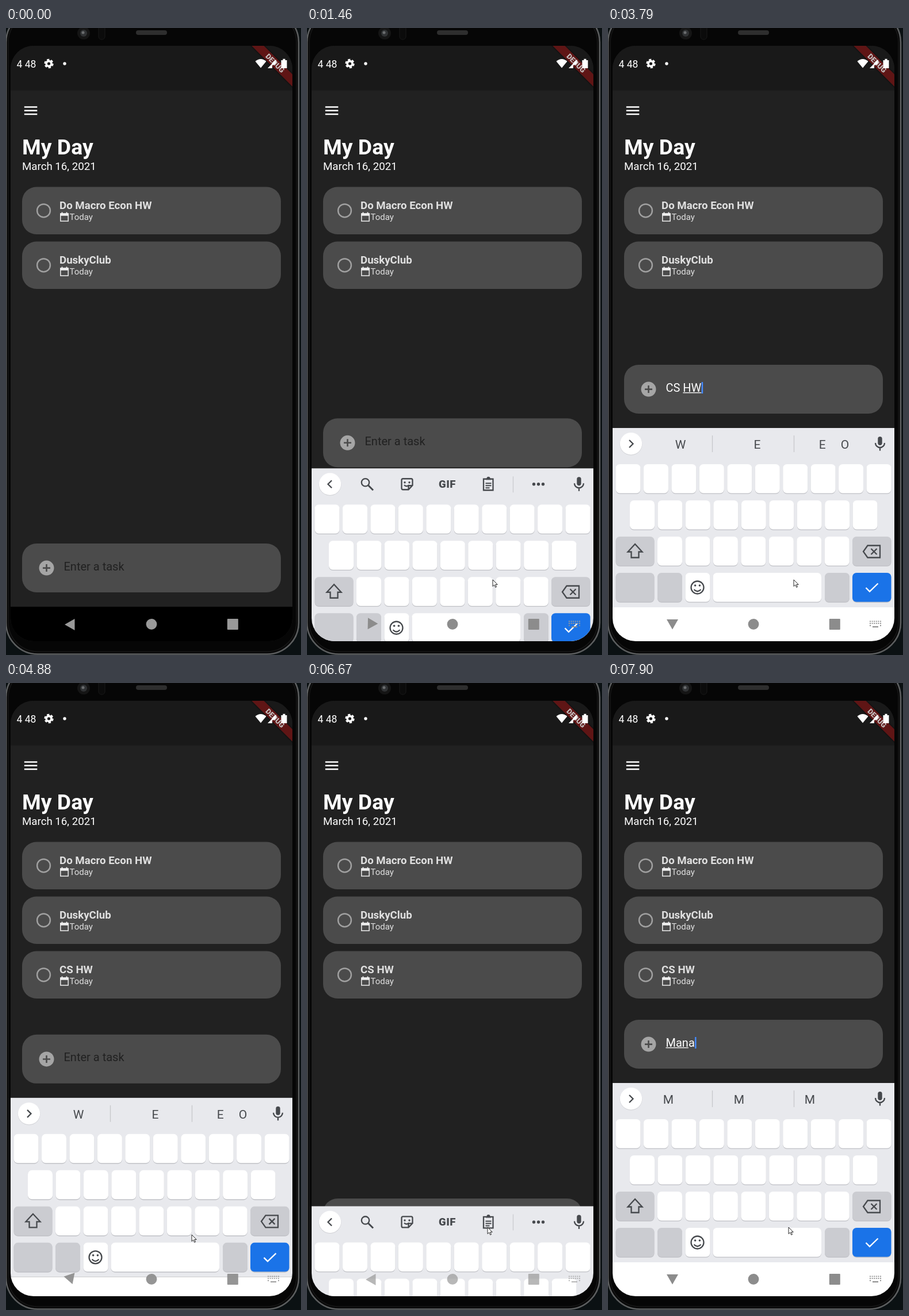
These frames come from a looping animation (513x1091 px, 8 s). An HTML page:

```html
<!DOCTYPE html>
<html lang="en">
<head>
<meta charset="utf-8">
<title>My Day</title>
<style>
  html, body { margin: 0; width: 100%; height: 100%; overflow: hidden; background: #050505; }
  svg { display: block; width: 100%; height: 100%; font-family: Roboto, sans-serif; }
  text { white-space: pre; }
  .line { fill: none; stroke: #46494d; stroke-width: 2.3; }
  .ink { fill: #46494d; }
</style>
</head>
<body>
<svg viewBox="0 0 513 1091">
  <defs>
    <clipPath id="screen"><rect x="8" y="31" width="490" height="1036" rx="40"/></clipPath>
    <g id="task">
      <rect x="28" width="450" height="82.5" rx="25" fill="#4b4b4b"/>
      <circle cx="65.5" cy="41.3" r="11.4" fill="none" stroke="#a0a0a0" stroke-width="2.5"/>
      <path d="M94.8 46.5h13.4v13H94.8z" fill="none" stroke="#eee" stroke-width="1.5"/>
      <path d="M94 46h15v4.2H94zM96.5 44h2v3h-2zM104.5 44h2v3h-2z" fill="#eee"/>
      <text x="110.5" y="57.7" font-size="15" fill="#e0e0e0">Today</text>
    </g>
  </defs>

  <!-- phone body -->
  <rect width="513" height="1091" fill="#0b1113"/>
  <rect y="-30" width="509" height="1119.5" rx="55" fill="#090909" stroke="#5c5e5f" stroke-width="2.6"/>
  <rect x="4" y="-26" width="501" height="1111" rx="51" fill="#060606" stroke="#171717" stroke-width="1.5"/>
  <circle cx="135" cy="9" r="11" fill="#151515"/><circle cx="135" cy="9" r="6" fill="#303234"/>
  <circle cx="134" cy="8" r="2.5" fill="#6a6c6e"/>
  <rect x="161" y="-5" width="11" height="25" rx="5" fill="#0b0b0b" stroke="#181818"/>
  <rect x="226" y="4" width="54" height="8" rx="4" fill="#2e2e2e"/>

  <g clip-path="url(#screen)">
    <rect x="8" y="31" width="490" height="1036" fill="#212121"/>
    <rect x="8" y="31" width="490" height="77.5" fill="#191919"/>
    <rect x="8" y="1007" width="490" height="60" fill="#000"/>

    <g transform="translate(498 31) rotate(45)">
      <rect x="-60" y="33" width="120" height="19" fill="#000" opacity=".25"/>
      <rect x="-60" y="35" width="120" height="15" fill="#5f1515"/>
      <text y="47" font-size="12.7" font-weight="900" text-anchor="middle" fill="#c4bfbf">DEBUG</text>
    </g>

    <!-- status bar -->
    <g fill="#fff">
      <text x="18.5" y="68.8" font-size="17.5">4 48</text>
      <circle cx="74.5" cy="62" r="4.4" fill="none" stroke="#fff" stroke-width="3.6"/>
      <circle cx="74.5" cy="62" r="6.9" fill="none" stroke="#fff" stroke-width="2.6" stroke-dasharray="4.2 3.025"/>
      <circle cx="102" cy="62" r="2.7"/>
      <path d="M443 69.5 433.5 58Q443 50 452.5 58z"/>
      <path d="M455 70 469.5 55V62L463 65V70z"/>
      <path d="M478.5 56h3v-2.3h4V56h3v14h-10z"/>
    </g>

    <path d="M31.8 137.6H54.3M31.8 143.8H54.3M31.8 150H54.3" stroke="#fff" stroke-width="2.5"/>
    <text x="28" y="220" font-size="37.4" font-weight="700" fill="#fff">My Day</text>
    <text x="28" y="246.6" font-size="18.7" fill="#fff">March 16, 2021</text>
    <g id="tasks"></g>

    <g id="entry">
      <rect x="28" width="450" height="85" rx="25" fill="#4b4b4b"/>
      <circle cx="70.5" cy="42.6" r="13" fill="#a5a5a5"/>
      <path d="M64 42.6h13M70.5 36.1v13" stroke="#4b4b4b" stroke-width="2.6"/>
      <text id="hint" x="100.5" y="46.5" font-size="20" fill="#212121">Enter a task</text>
      <text id="typed" x="100.5" y="46.5" font-size="20" fill="#fff"></text>
      <rect id="underline" y="48" height="1.3" fill="#fff"/>
      <rect id="caret" y="30" width="2.5" height="20" fill="#448aff"/>
    </g>

    <g id="keyboard">
      <rect x="8" width="490" height="312" fill="#e8e9ed"/>
      <rect x="8" y="312" width="490" height="70" fill="#fff"/>
      <g id="keys"></g>
      <path class="line" d="M47 202 34.5 215.5H40.5V225.5H53.5V215.5H59.5z"/>
      <path class="line" d="M451.5 204.5H473V225.5H451.5L444 215zM457.5 210l10 10m0-10-10 10"/>
      <g class="line"><circle cx="155.5" cy="277.5" r="11"/><path d="M149.5 281q6 6.5 12 0"/></g>
      <g class="ink"><circle cx="151.6" cy="274" r="1.8"/><circle cx="159.4" cy="274" r="1.8"/></g>
      <path d="M448.5 278 455 284.5 469.5 270.5" fill="none" stroke="#fff" stroke-width="2.4"/>

      <circle cx="40" cy="28" r="19.5" fill="#cfd0d4"/><circle cx="40" cy="27.3" r="19.2" fill="#fff"/>
      <path id="chevron" class="line" d="M3-6.5-3.5 0 3 6.5"/>
      <g id="tools">
        <g class="line">
          <circle cx="101.5" cy="24.5" r="6.7"/><path d="M106.5 29.5 115 38" style="stroke-width:3"/>
          <path d="M167 18H181Q183.500 18 183.500 20.500V29.500L176.500 37H167Q164.500 37 164.500 34.500V20.500Q164.500 18 167 18zM183 30H176.500V37M169 29q4 4 8.500 0"/>
          <path d="M307 18.500H323.500V38H307z"/>
          <path d="M310.500 26H320.500M310.500 30H320.500M310.500 34H317.500" style="stroke-width:1.900"/>
        </g>
        <g class="ink">
          <circle cx="170" cy="24.500" r="1.700"/><circle cx="178" cy="24.500" r="1.700"/>
          <path d="M311 17.500H312.500a3 3 0 0 1 6 0H320V20H311z"/>
          <circle cx="394.500" cy="27.500" r="2.700"/><circle cx="402.500" cy="27.500" r="2.700"/><circle cx="410.500" cy="27.500" r="2.700"/>
          <text x="244" y="33.700" font-size="18.500" font-weight="900" letter-spacing=".6" text-anchor="middle">GIF</text>
        </g>
        <path d="M358.500 14V42" stroke="#cbccd0" stroke-width="1.300"/>
      </g>
      <g id="suggestions">
        <path d="M181.500 13V42M323.500 13V42" stroke="#c6c7cb" stroke-width="1.300"/>
        <g id="words" class="ink" font-size="21" text-anchor="middle"></g>
      </g>
      <rect class="ink" x="469.300" y="15" width="7.400" height="15" rx="3.700"/>
      <path class="line" d="M465 26a8 8 0 0 0 16 0M473 34V39.500"/>
    </g>

    <g id="nav">
      <path id="back" d="M-11 0 6.500-10V10z"/>
      <circle cx="253" cy="1037.300" r="9.400"/>
      <rect x="384.800" y="1028" width="19" height="19" rx="1"/>
      <g id="imeIcon">
        <path d="M455 1032.500h20M455 1036.100h20" fill="none" stroke="#999" stroke-width="2" stroke-dasharray="2 1.600"/>
        <path d="M455 1038.700h2v2h-2zM473 1038.700h2v2h-2zM460 1041h10v2h-10z"/>
      </g>
    </g>
  </g>
  <path id="pointer" d="M0 0V11.500L2.700 9 4.700 13.300 6.500 12.500 4.600 8.400H8.200z" fill="#fff" stroke="#111" stroke-width=".9"/>
</svg>

<script>
const LOOP = 8000, FRAME = 70.4, KEYBOARD = 371, NAV = 60, TYPE_LAG = 150;
const SECOND_TAP = 6050;

// One entry of a task: when the field gets focus, the keyboard moves and the keys fall.
const sessions = [
  { focus: 900, open: 1319, close: 4800, text: 'CS HW', type: 2700, gap: 235,
    hints: ['W', 'E', 'E     O'], hintX: 126, hintGap: 133.5 },
  { focus: 6350, open: 6614, close: Infinity, text: 'Mana', type: 7060, gap: 280,
    hints: ['M', 'M', 'M'], hintX: 105, hintGap: 123 },
];

const $ = id => document.getElementById(id);
const move = (id, x, y, angle = 0) => $(id).setAttribute('transform', `translate(${x} ${y}) rotate(${angle})`);
const show = (id, opacity) => $(id).setAttribute('opacity', opacity);
const clamp = x => Math.min(1, Math.max(0, x));
const easeOut = x => 1 - (1 - clamp(x)) ** 3;
const easeInOut = x => clamp(x) ** 2 * (3 - 2 * clamp(x));
const hold = t => Math.floor((t - 51.5) / FRAME) * FRAME + 51.5;

const pen = document.createElement('canvas').getContext('2d');
const widthOf = text => {
  pen.font = '20px Roboto, sans-serif';
  return pen.measureText(text).width;
};

function buildTasks() {
  $('tasks').innerHTML = ['Do Macro Econ HW', 'DuskyClub', 'CS HW'].map((title, i) =>
    `<g id="task${i}" transform="translate(0 ${276.5 + 95 * i})"><use href="#task"/>
     <text x="93" y="38.5" font-size="18.7" font-weight="700" fill="#e0e0e0">${title}</text></g>`).join('');
}

function buildKeys() {
  const grey = '#cbccd1', pitch = 48.45;
  let html = '';
  const key = (x, row, width = 43, fill = '#fff') => {
    const y = 63 + 63 * row;
    const box = (top, color) =>
      `<rect x="${x}" y="${top}" width="${width}" height="50.5" rx="7" fill="${color}"/>`;
    html += box(y + 1.3, '#bfc0c5') + box(y, fill);
  };
  const run = (x, row, count) => {
    for (let i = 0; i < count; i++) key(x + pitch * i, row);
  };
  run(13.5, 0, 10);
  run(38, 1, 9);
  run(86, 2, 7);
  for (const row of [2, 3]) key(13.5, row, 67, grey);
  key(425, 2, 67.5, grey);
  key(86, 3, 43, grey);
  key(134.5, 3);
  key(182.5, 3, 188.5);
  key(377, 3, 43, grey);
  key(425, 3, 67.5, '#1a73e8');
  $('keys').innerHTML = html;
}

function textAt(s, t) {
  if (t >= s.close) return '';
  return s.text.slice(0, Math.max(0, Math.floor((t - s.type) / s.gap) + 1));
}

function drawEntry(s, t) {
  const text = textAt(s, t), marked = textAt(s, t - TYPE_LAG);
  const wordStart = text.lastIndexOf(' ') + 1;
  $('hint').setAttribute('display', text ? 'none' : 'inline');
  $('typed').textContent = text;
  $('underline').setAttribute('x', 100.5 + widthOf(text.slice(0, wordStart)));
  $('underline').setAttribute('width', text ? widthOf(marked.slice(wordStart)) : 0);
  $('caret').setAttribute('x', 100.8 + widthOf(text));
  const blink = Math.floor((t - s.focus) / 510) % 2 === 0;
  show('caret', t >= s.focus && t < s.close && (text || blink) ? 1 : 0);
}

function drawSuggestions(s, t) {
  const fade = clamp((t - s.type + 60) / 280);
  show('tools', 1 - fade);
  show('suggestions', fade);
  move('chevron', 40, 27.5, 180 * fade);
  const marked = textAt(s, t - TYPE_LAG);
  const initial = textAt(s, t).split(' ').pop().charAt(0);
  $('words').innerHTML = s.hints.map((hint, i) =>
    `<text x="${s.hintX + s.hintGap * i}" y="36">${marked === s.text ? hint : initial}</text>`).join('');
}

function drawKeyboard(s, t) {
  const stay = 1 - easeInOut((t - s.close) / 240);
  const layout = easeInOut((t - s.open - 10) / 194) * stay;
  move('keyboard', 0, 1067 - KEYBOARD * easeOut((t - s.open) / 330) * stay);
  move('entry', 0, 897 - Math.max(0, KEYBOARD * layout - NAV));

  const turn = clamp((t - s.open - 70) / 105) * stay;
  const dark = clamp((t - s.open) / 140) * stay;
  const grey = Math.round(153 - 13 * dark);
  move('back', 113 - turn, 1038 - 2.5 * turn, 270 * turn);
  $('nav').setAttribute('fill', `rgb(${grey},${grey},${grey})`);
  show('nav', 1 - .35 * Math.sin(Math.PI * dark));
  show('imeIcon', clamp((t - s.focus + 70) / 230) * stay);
}

function drawPointer(t) {
  const rest = 1 - easeInOut((t - 280) / 400);
  if (t < SECOND_TAP) move('pointer', 323 + 60 * rest, 960 + 67 * rest);
  else move('pointer', 314, 947);
  show('pointer', t < 280 ? 0 : 1);
}

function draw(now) {
  const t = now % LOOP;
  const s = sessions[t < SECOND_TAP ? 0 : 1];
  $('task2').setAttribute('display', t < sessions[0].close ? 'none' : 'inline');
  drawEntry(s, t);
  drawSuggestions(s, t);
  drawKeyboard(s, hold(t));
  drawPointer(t);
}

buildTasks();
buildKeys();
draw(0);
let start;
requestAnimationFrame(function frame(now) {
  start ??= now;
  draw(Math.max(0, now - start));
  requestAnimationFrame(frame);
});
</script>
</body>
</html>
```
